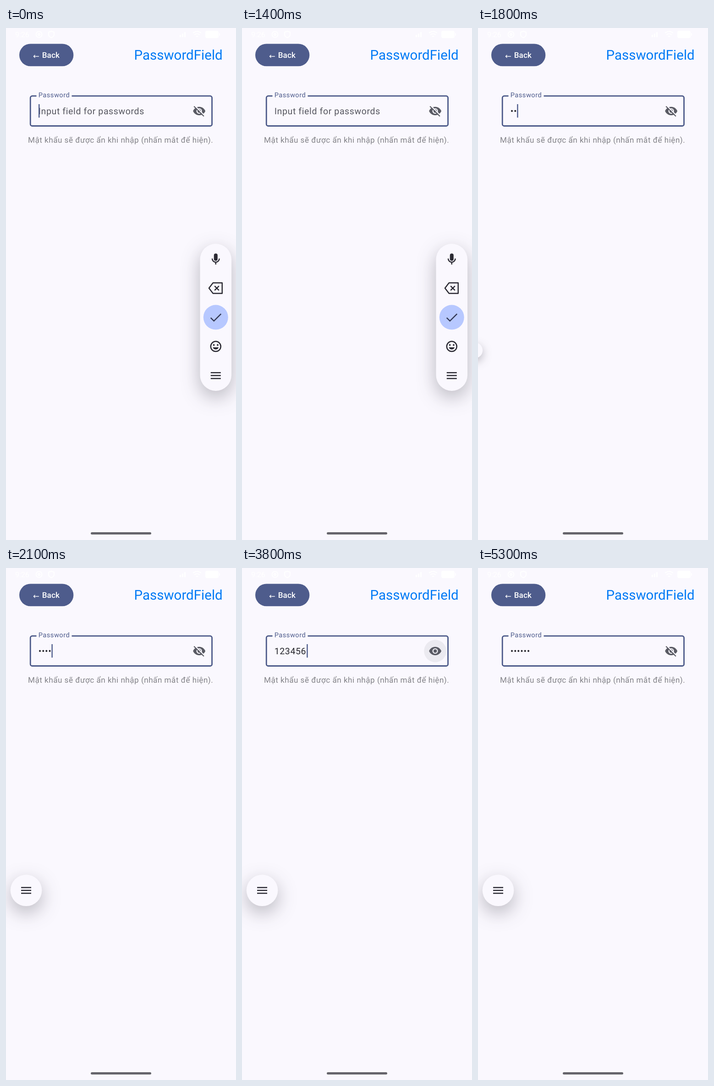
An HTML page for the animation above (5.4 s loop, 502 by 1116 pixels).

```html
<!DOCTYPE html>
<html lang="vi">
<head>
<meta charset="utf-8">
<title>PasswordField</title>
<style>
  html, body { margin: 0; width: 100%; height: 100%; overflow: hidden; background: #faf8fe; }
  svg { display: block; width: 100vw; height: 100vh; font-family: Roboto, sans-serif; text-rendering: geometricPrecision; }
  .line { fill: none; stroke: #2b2a33; stroke-width: 2.5; }
  .ink { fill: #2b2a33; }
  .input { font-size: 19.53px; letter-spacing: .61px; }
  .float { filter: url(#shadow); }
</style>
</head>
<body>
<svg viewBox="0 0 502 1116">
  <defs>
    <filter id="shadow" filterUnits="userSpaceOnUse" x="-130" y="-260" width="260" height="540" color-interpolation-filters="sRGB">
      <feDropShadow dx="0" dy="14" stdDeviation="20" flood-color="#282430" flood-opacity=".31"/>
    </filter>
    <path id="menu" class="line" d="M-11-6.3H11M-11 0H11M-11 6.3H11"/>
  </defs>
  <rect width="502" height="1116" fill="#faf8fe"/>

  <!-- status bar -->
  <g fill="#fff">
    <text x="20" y="20" font-size="16">9:26</text>
    <path d="M379 20v-5h3v5zM384 20v-8h3v8zM389 20v-11h3v11z"/>
    <rect x="435" y="6" width="29" height="16" rx="4"/>
    <rect x="465" y="11" width="2" height="6" rx="1"/>
    <g fill="none" stroke="#fff" stroke-width="2">
      <circle cx="72" cy="14" r="6.5"/>
      <circle cx="72" cy="14" r="2"/>
      <path d="M99 7l6 2v5q0 5-6 7q-6-2-6-7v-5z"/>
      <path d="M408 11q9-7 18 0M411 15q6-5 12 0M415 19q2-2 4 0"/>
    </g>
  </g>

  <!-- header -->
  <rect x="29" y="34.5" width="118.3" height="48.8" rx="24.4" fill="#4e5c8c"/>
  <text x="59" y="67" font-size="16.5" fill="#fff" font-family="DejaVu Sans, sans-serif">←</text>
  <text x="78.7" y="65.2" font-size="17.1" font-weight="500" letter-spacing=".12" fill="#fff">Back</text>
  <text x="472.7" y="68.8" font-size="29.5" text-anchor="end" fill="#007af5">PasswordField</text>

  <!-- text field -->
  <path d="M143.5 148.2H445.6a4 4 0 0 1 4 4V209.5a4 4 0 0 1-4 4H57.2a4 4 0 0 1-4-4V152.2a4 4 0 0 1 4-4H66.5"
        fill="none" stroke="#4a5888" stroke-width="2.8"/>
  <text x="70.7" y="151" font-size="14.65" letter-spacing=".49" fill="#4e5c8c">Password</text>
  <text id="hint" class="input" x="70.7" y="187.5" fill="#56575f">Input field for passwords</text>
  <text id="value" class="input" x="70.7" y="187.5" fill="#26262c"></text>
  <rect id="caret" y="166" width="2.4" height="29.3" fill="#4e5c8c"/>
  <text x="48" y="250" font-size="17.1" letter-spacing=".5" fill="#838388">Mật khẩu sẽ được ẩn khi nhập (nhấn mắt để hiện).</text>

  <!-- visibility toggle -->
  <circle id="halo" cx="421.7" cy="181" r="24.4" fill="#45464f"/>
  <g transform="translate(407.05 166.35) scale(1.22)" fill="#5a5b64">
    <path fill-rule="evenodd" d="M12 4.5C7 4.5 2.73 7.61 1 12c1.73 4.39 6 7.5 11 7.5s9.27-3.11 11-7.5C21.27 7.61 17 4.5 12 4.5zM7 12a5 5 0 0 1 10 0a5 5 0 0 1-10 0z"/>
    <circle cx="12" cy="12" r="3"/>
    <g id="slash" fill="none" stroke-width="1.8">
      <path d="M3.9 2.35L21.6 20.1" stroke="#faf8fe"/>
      <path d="M2.64 3.64L20.36 21.36" stroke="#5a5b64"/>
    </g>
  </g>

  <!-- pointer -->
  <g id="pointer">
    <circle cx="169" cy="189" r="11.3" fill="#777" opacity=".22"/>
    <circle cx="169" cy="188.3" r="10" fill="#dededf" opacity=".85"/>
  </g>

  <!-- tool panel -->
  <g id="panel">
    <rect class="float" x="-34.3" y="-160.3" width="68.6" height="320.6" rx="34.3" fill="#faf8fe"/>
    <g transform="translate(0 -127.5)">
      <rect class="ink" x="-4" y="-11.5" width="8" height="16" rx="4"/>
      <path class="line" d="M-7.8-.5a7.8 7.8 0 0 0 15.6 0M0 7V12.5"/>
    </g>
    <path class="line" stroke-linejoin="round" d="M-14.8-63.5L-6-75H14V-52H-6zM-2.5-68.3L7-58.8M7-68.3L-2.5-58.8"/>
    <circle r="27" fill="#b7c8ff"/>
    <path class="line" style="stroke:#343a55" d="M-11 1L-4 8L11.5-7.5"/>
    <g transform="translate(0 63.5)">
      <circle class="line" r="11"/>
      <circle class="ink" cx="-4.2" cy="-3.2" r="1.9"/>
      <circle class="ink" cx="4.2" cy="-3.2" r="1.9"/>
      <path class="ink" d="M-6.3 2H6.3a6.6 6.6 0 0 1-12.6 0z"/>
    </g>
    <use href="#menu" y="127"/>
  </g>
  <g id="fab">
    <circle class="float" r="34.3" fill="#faf8fe"/>
    <use href="#menu"/>
  </g>

  <rect x="185" y="1099" width="132" height="5" rx="2.5" fill="#66656c"/>
</svg>
<script>
const LOOP = 5400, STEP = 100;
const KEYS = [1500, 1700, 1900, 2100, 2300, 2700];
const REVEAL = [3300, 4200];
const FIELD_X = 71, DOT = 7.1, DIGIT = 11.7;

const el = id => document.getElementById(id);
const [hint, value, caret, halo, slash, pointer, panel, fab] =
  ["hint", "value", "caret", "halo", "slash", "pointer", "panel", "fab"].map(el);

const within = (t, a, b) => t >= a && t < b;
const ramp = (t, a, b) => {
  const p = Math.min(1, Math.max(0, (t - a) / (b - a)));
  return p * p * (3 - 2 * p);
};
const show = (node, on) => node.setAttribute("visibility", on ? "visible" : "hidden");
const place = (node, x, y, s) => {
  show(node, s > 0);
  node.setAttribute("transform", `translate(${x} ${y}) scale(${s})`);
};

// The caret blinks every 500 ms, restarting with each key.
function caretOn(t, typed) {
  const start = typed ? KEYS[typed - 1] : -200;
  return (t - start) % 1000 < 500;
}

function draw(t) {
  const typed = KEYS.filter(k => t >= k).length;
  const plain = within(t, ...REVEAL);

  show(hint, !typed);
  value.textContent = plain ? "123456".slice(0, typed) : "•".repeat(typed);
  caret.setAttribute("x", FIELD_X + typed * (plain ? DIGIT : DOT));
  show(caret, caretOn(t, typed));

  halo.setAttribute("opacity", .08 * (ramp(t, 2950, 3100) - ramp(t, 4200, 4400)));
  show(slash, !plain);
  show(pointer, within(t, 400, 800));

  const out = ramp(t, 1400, 1700), come = ramp(t, 1700, 1900);
  place(panel, 457.8 + 102 * out, 630.6, 1 - out);
  place(fab, 44 - 102 * (1 - come), 702.7, come);
}

const origin = performance.now();
function tick() {
  const t = (performance.now() - origin) % LOOP;
  draw(Math.floor(t / STEP) * STEP);
  requestAnimationFrame(tick);
}
tick();
</script>
</body>
</html>
```
